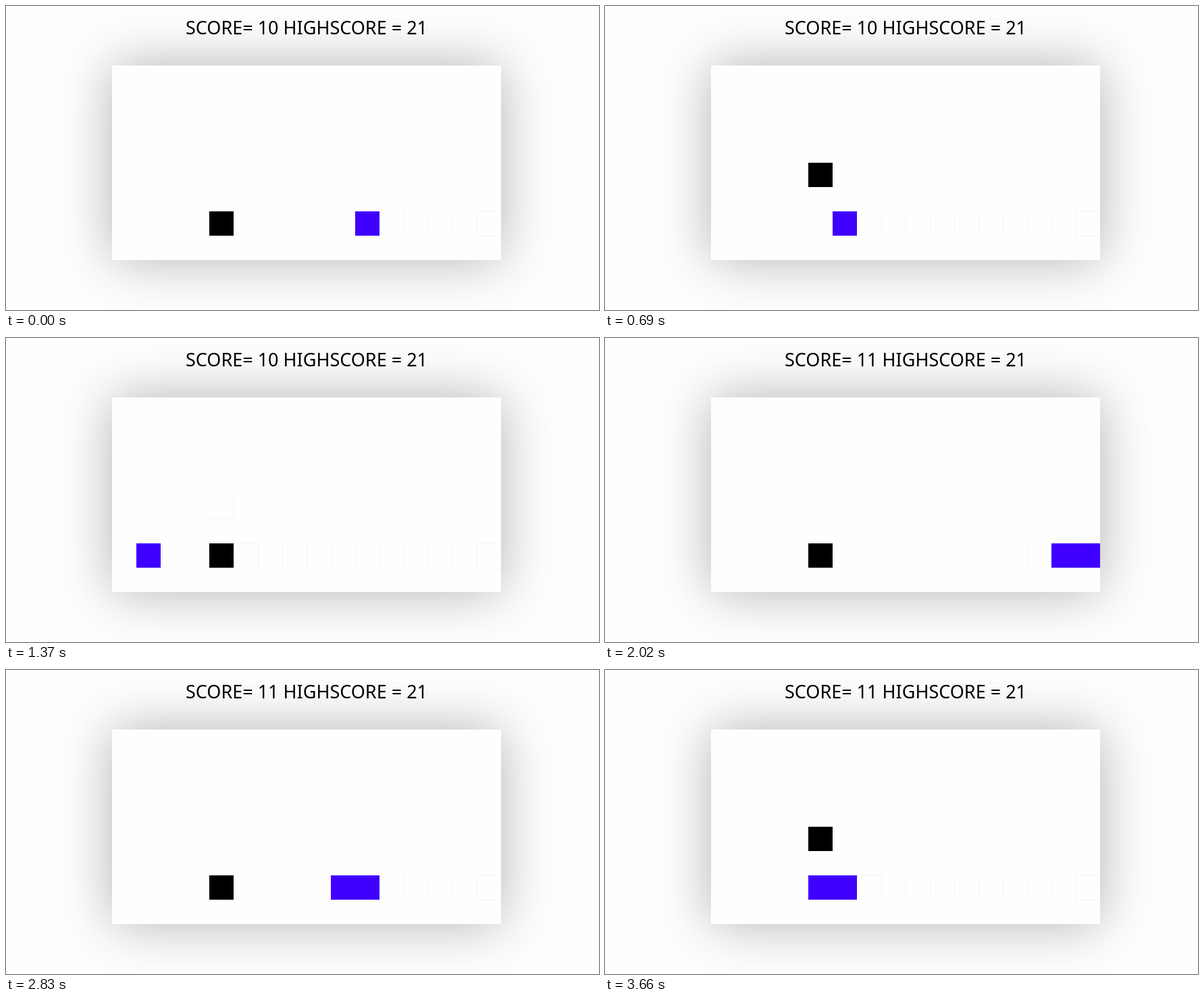
Recreate the animation shown at these times as an HTML page with a canvas. Size 878 by 450 pixels, loop 3.76 s.

```html
<!DOCTYPE html>
<html lang="en">
<head>
<meta charset="utf-8">
<style>
  html, body { margin: 0; width: 100%; height: 100%; overflow: hidden; background: #fefefe; }
  canvas { display: block; }
</style>
</head>
<body>
<canvas id="stage" width="878" height="450"></canvas>
<script>
const ctx = document.getElementById('stage').getContext('2d');
const LOOP = 3760, CELL = 36, LEFT = 157, TOP = 88, COLS = 16, ROWS = 8, GROUND = 6;
const SCORED = 1690;
const FIRST_MOVES = [30, 200, 360, 530, 690, 870, 1020, 1180, 1370, 1520, SCORED];
const SECOND_MOVES = [1850, 2020, 2180, 2350, 2540, 2680, 2830, 3010, 3190, 3370, 3500, 3660];

const colX = col => LEFT + col * CELL;
const rowY = row => TOP + row * CELL;
const passed = (times, t) => times.filter(time => t >= time).length;

function rect(x, y, w, h, color) {
  ctx.fillStyle = color;
  ctx.fillRect(x, y, w, h);
}
const trace = (x, y, w, h) => rect(x, y, w, h, '#f3f3f3');

function playerRow(t) {
  if (t >= 3440) return 4;
  if (t < 600 || t >= 1370) return GROUND;
  return t < 1180 ? 4 : 5;
}

function drawBoard() {
  rect(0, 0, 878, 450, '#fefefe');
  ctx.save();
  ctx.shadowColor = 'rgba(0,0,0,.3)';
  ctx.shadowBlur = 75;
  rect(LEFT, TOP, COLS * CELL, ROWS * CELL, '#fefefe');
  ctx.restore();
}

// Faint edges left behind where cells were cleared
function drawTraces(t, right) {
  const y = rowY(GROUND), bottom = y + CELL;
  const start = t >= SCORED && t < 2180 ? 13 : Math.max(5, right + 1);
  for (let col = start; col < COLS; col++) trace(colX(col), y, 1, CELL);
  if (start < COLS) {
    trace(colX(15), y - 1, CELL, 1);
    trace(colX(15), bottom, CELL, 1);
  }
  if (t >= 3660) trace(colX(6), y - 1, CELL, 1);
  if (t >= SCORED) return;
  if (t >= 870) trace(colX(5), y - 1, CELL, 1);
  if (t >= 1020) trace(colX(4), bottom, CELL, 1);
  if (t >= 1180) {
    trace(colX(5), rowY(4), 1, CELL);
    trace(colX(4), rowY(5) - 1, CELL + 1, 1);
  }
}

function draw(t) {
  const second = t >= SCORED;
  const col = second ? 16 - passed(SECOND_MOVES, t) : 10 - passed(FIRST_MOVES, t);
  const right = col + (second ? 2 : 1);

  drawBoard();
  drawTraces(t, right);
  const visible = Math.min(right, COLS) - col;
  if (visible > 0) rect(colX(col), rowY(GROUND), visible * CELL, CELL, '#4000ff');
  rect(colX(4), rowY(playerRow(t)), CELL, CELL, '#000');

  ctx.font = '27px "Noto Sans", sans-serif';
  ctx.textAlign = 'center';
  ctx.fillStyle = '#000';
  ctx.fillText(`SCORE= ${second ? 11 : 10} HIGHSCORE = 21`, 445, 42);
}

function tick() {
  draw(performance.now() % LOOP);
  requestAnimationFrame(tick);
}
tick();
</script>
</body>
</html>
```
